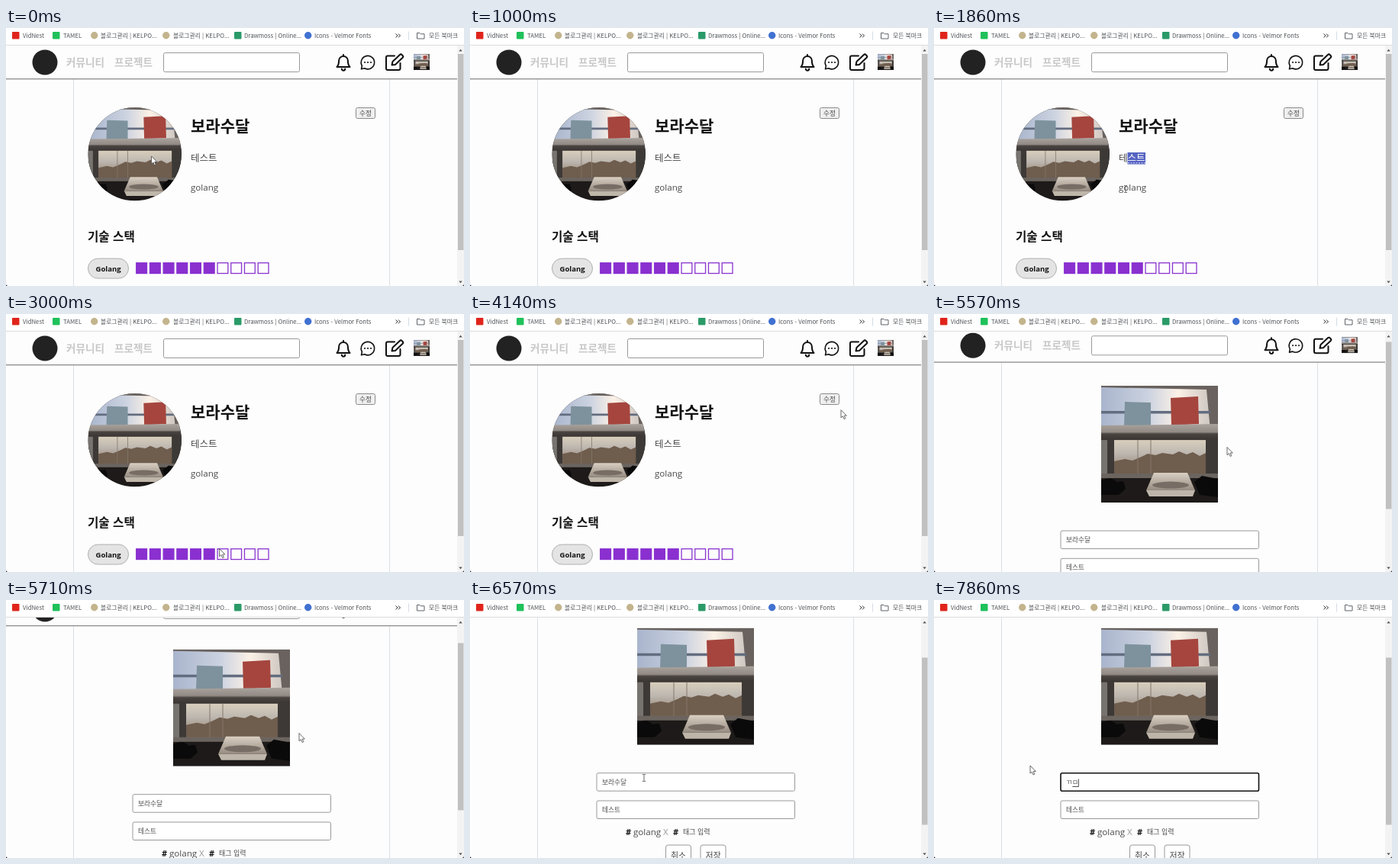
These frames come from a looping animation (600x338 px, 8000 ms). An HTML page:

```html
<!DOCTYPE html>
<html lang="ko">
<head>
<meta charset="utf-8">
<title>프로필 수정</title>
<style>
html, body { margin: 0; width: 100%; height: 100%; overflow: hidden; background: #fff; }
#stage { display: block; width: 100vw; height: 100vh; }
text { font-family: "Noto Sans CJK KR", "Noto Sans CJK", sans-serif; fill: #4a4a4a; white-space: pre; }
.latin { font-family: "Open Sans", "Noto Sans", sans-serif; }
.mark { font-size: 7.8px; fill: #505357; }
.nav { font-size: 13.6px; font-weight: 700; fill: #c8c8c8; }
.body { font-size: 12.5px; font-weight: 300; }
.small { font-size: 8.7px; }
.bold { font-weight: 700; fill: #111; }
.line { fill: none; stroke: #111; stroke-width: 2; stroke-linejoin: round; stroke-linecap: round; }
.field { fill: #fff; stroke: #999; }
.sel { fill: #5563c1; }
</style>
</head>
<body>
<svg id="stage" viewBox="0 0 600 338">
  <defs>
    <linearGradient id="sky">
      <stop offset="0" stop-color="#a9b5cd"/>
      <stop offset=".4" stop-color="#cbd2e0"/>
      <stop offset=".66" stop-color="#fbf1e6"/>
      <stop offset="1" stop-color="#c3bcb8"/>
    </linearGradient>
    <linearGradient id="view2" x2="0" y2="1">
      <stop offset="0" stop-color="#d8cebc"/>
      <stop offset=".4" stop-color="#bdb7b0"/>
      <stop offset="1" stop-color="#8d7a68"/>
    </linearGradient>
    <linearGradient id="shelf" x2="0" y2="1">
      <stop offset="0" stop-color="#aaa39d"/>
      <stop offset=".5" stop-color="#928a84"/>
      <stop offset=".62" stop-color="#4a4441"/>
      <stop offset="1" stop-color="#3a3532"/>
    </linearGradient>
    <linearGradient id="deck" x2="0" y2="1">
      <stop offset="0" stop-color="#d9cfc2"/>
      <stop offset="1" stop-color="#968b80"/>
    </linearGradient>
    <clipPath id="disc"><circle cx="76.5" cy="76.5" r="76.5"/></clipPath>
    <symbol id="photo" viewBox="0 0 153 153">
      <rect width="153" height="153" fill="#1d1a19"/>
      <rect width="153" height="54" fill="url(#sky)"/>
      <path d="M0 0H153V58H143L138 5 0 2z" fill="#69625e"/>
      <path d="M0 33H143V36.500H0z" fill="#636d80"/>
      <path d="M31 21l34 1v31l-35-1z" fill="#7d929d"/>
      <path d="M91 16l36-2 1 36-36 2z" fill="#a5453e"/>
      <path d="M0 52l153-2v21H0z" fill="url(#shelf)"/>
      <rect y="70" width="153" height="46" fill="#3d3936"/>
      <rect width="8" height="50" y="71" fill="#77736f"/>
      <rect x="17" y="71" width="120" height="44" fill="url(#view2)"/>
      <path d="M17 99l14-3 10 2 12-5 8-4 10 2 9-3 14 2 8-4 10 4 8-3 9 5 8-4V115H17z" fill="#6f5d4d"/>
      <path d="M48 71v44M65 71v44" stroke="#85796d"/>
      <path d="M0 115H153V121H0z" fill="#6b645f"/>
      <path d="M0 124q14-6 20 2l9-1 3 10-9 8H0zM122 126l10-8 21 4v24l-24-3z" fill="#0b0a0a"/>
      <path d="M69 114h44l10 23H59z" fill="url(#deck)"/>
      <ellipse cx="91" cy="130" rx="24" ry="4.500" fill="#776d64"/>
      <path d="M59 137h64l-3 8H63z" fill="#bfb6aa"/>
    </symbol>
  </defs>

  <rect width="600" height="338" fill="#fdfdfd"/>

  <svg y="23" width="591" height="315" viewBox="0 23 591 315">
    <g id="page">
      <path d="M88.500 67V500M502.500 67V500" stroke="#d9e0e6" fill="none"/>
      <circle cx="51" cy="45" r="16.500" fill="#222"/>
      <text class="nav" x="79" y="49.500">커뮤니티</text>
      <text class="nav" x="142" y="49.500">프로젝트</text>
      <rect class="field" x="206.500" y="32.500" width="178" height="25" rx="2"/>
      <path class="line" d="M433.500 51h17c-2.300-2.300-2.600-4.500-2.600-8.200a5.900 5.900 0 0 0-11.800 0c0 3.700-.3 5.900-2.600 8.200zM442 35v1.500M439.800 53.500a2.200 2.200 0 0 0 4.400 0"/>
      <path class="line" style="stroke-width:1.600" d="M466.400 49.500a8.700 8.700 0 1 1 3.400 3.300l-4.300 1z"/>
      <path class="line" d="M470 45h.1M474 45h.1M478 45h.1"/>
      <path class="line" d="M509 36.500h-9q-2 0-2 2v14.500q0 2 2 2h14.500q2 0 2-2v-7M505.500 48.500l1-4.500 9.500-9q1.300-1.200 2.500 0l1.200 1.200q1.200 1.200 0 2.500l-9.700 9.300z"/>
      <use href="#photo" x="534" y="34" width="21" height="21"/>
      <path d="M0 66.800H591" stroke="#6a6a6a"/>

      <g id="view">
        <g transform="translate(107.500 104) scale(.8)"><g clip-path="url(#disc)"><use href="#photo" width="153" height="153"/></g></g>
        <text id="title" class="bold" x="242" y="136" font-size="21"></text>
        <rect id="wordSel" class="sel" x="253.500" y="163" width="23.500" height="15.500"/>
        <text class="body" x="242" y="175">테<tspan id="word">스트</tspan></text>
        <path id="wordLine" d="M254 176.800h23" stroke="#dfe2ff" stroke-dasharray="2 1.500"/>
        <text class="latin" x="242" y="213" font-size="11.600">golang</text>
        <rect x="458.500" y="104.500" width="25" height="14" rx="2" fill="#efefef" stroke="#8a8a8a"/>
        <text class="small" x="463" y="115">수정</text>
        <text class="bold" x="107" y="278.500" font-size="15.600">기술 스택</text>
        <rect x="107.500" y="302" width="53" height="26" rx="13" fill="#e4e4e4" stroke="#b0b0b0"/>
        <text class="latin bold" x="117.500" y="318.500" font-size="9.500">Golang</text>
        <g id="level" stroke="#8a34d0" stroke-width="1.300"></g>
      </g>

      <g id="edit">
        <use href="#photo" x="219" y="97.800" width="153" height="153"/>
        <rect id="nameBox" class="field" x="166" y="287.700" width="259.500" height="23.500" rx="2"/>
        <rect id="nameSel" class="sel" y="293.500" height="12.500"/>
        <text class="small" x="173" y="303"><tspan id="kept"></tspan><tspan id="picked" fill="#fff"></tspan></text>
        <path id="caret" stroke="#222" stroke-width=".8" fill="none"/>
        <rect class="field" x="166" y="324" width="259.500" height="23.500" rx="2"/>
        <text class="small" x="173" y="339">테스트</text>
        <text class="latin bold" x="204" y="369" font-size="11">#</text>
        <text class="latin" x="214" y="369" font-size="11.600">golang</text>
        <text class="latin" x="253" y="369" font-size="11.600" style="fill:#999">X</text>
        <text class="latin bold" x="266" y="369" font-size="11">#</text>
        <text x="279" y="367.500" font-size="9">태그 입력</text>
        <rect class="field" x="256.500" y="382" width="33" height="26" rx="3"/>
        <rect class="field" x="302" y="382" width="33" height="26" rx="3"/>
        <text x="263" y="399.500" font-size="11">취소</text>
        <text x="308.500" y="399.500" font-size="11">저장</text>
      </g>
    </g>
  </svg>

  <rect x="591" y="23" width="9" height="315" fill="#f3f3f3"/>
  <path d="M593.300 30.500h4.400l-2.200-2.800zM593.300 331.500h4.400l-2.200 2.800z" fill="#555"/>
  <rect id="thumb" x="592" width="7.500" fill="#c1c1c1"/>

  <rect width="600" height="23" fill="#fff"/>
  <path d="M0 22.500H600" stroke="#dcdcdc"/>
  <g id="marks"></g>
  <path d="M510.500 7.500l2.500 2.500-2.500 2.500M514 7.500l2.500 2.500-2.500 2.500" fill="none" stroke="#333"/>
  <path d="M527.500 4.500v11" stroke="#d5dbe3"/>
  <path d="M538.500 6.500h3.500l1.200 1.300h4.800v6.200h-9.500z" fill="none" stroke="#5f6368"/>
  <text class="mark" x="554" y="12.800">모든 북마크</text>
  <path d="M0 335q0 3 3 3H0zM600 335q0 3-3 3h3z" fill="#222"/>

  <path id="arrow" d="M0 0V10.200L2.400 8.100 4.100 12 5.800 11.200 4.200 7.500H7.300z" fill="#fff" stroke="#444" stroke-width=".8"/>
  <path id="beam" d="M-2-4.500H-.6L0-4 .6-4.500H2M0-4V4M-2 4.500H-.6L0 4 .6 4.500H2" fill="none" stroke="#555" stroke-width=".9"/>
</svg>
<script>
const LOOP = 8000, RATE = 7;
const NAME = "보라수달";
const $ = id => document.getElementById(id);

function add(parent, tag, attrs, text = "") {
  const el = document.createElementNS("http://www.w3.org/2000/svg", tag);
  for (const key in attrs) el.setAttribute(key, attrs[key]);
  el.textContent = text;
  parent.append(el);
}

// icon x, shape, colour, label x, label
const bookmarks = [
  [8, "rect", "#e0241b", 22, "VidNest"],
  [61, "rect", "#1fc15b", 75, "TAMEL"],
  [111, "circle", "#c3b48d", 124, "블로그관리 | KELPO..."],
  [205, "circle", "#c3b48d", 219, "블로그관리 | KELPO..."],
  [299, "rect", "#2a9a68", 312, "Drawmoss | Online..."],
  [391, "circle", "#4070d0", 404, "Icons - Velmor Fonts"]
];
for (const [x, shape, fill, tx, label] of bookmarks) {
  const box = shape === "rect"
    ? { x, y: 5, width: 9.5, height: 9.5, rx: 1 }
    : { cx: x + 4.7, cy: 9.8, r: 4.7 };
  add($("marks"), shape, { ...box, fill });
  add($("marks"), "text", { class: "mark", x: tx, y: 12.8 }, label);
}
for (let i = 0; i < 10; i++) {
  add($("level"), "rect", {
    x: 170.7 + i * 17.72, y: 307.7, width: 13.8, height: 13.8,
    fill: i < 6 ? "#8a2fd0" : "none"
  });
}
$("title").textContent = NAME;

// time, x, y, 1 = text pointer
const pointer = [
  [0, 190.5, 168, 0], [290, 184, 175, 0], [570, 222, 150, 0], [860, 290, 120, 1],
  [1140, 318, 129, 1], [1290, 314, 132, 1], [1570, 277, 171, 1], [1710, 253, 171, 1],
  [1860, 251, 211, 1], [2290, 290, 212, 0], [2860, 325, 306, 0], [3430, 140, 312, 0],
  [3570, 131, 308, 0], [3860, 330, 220, 0], [4140, 486, 125.7, 0], [4430, 476, 110, 0],
  [4570, 481, 111, 0], [4710, 481, 111, 0], [5000, 440, 146, 0], [5290, 384, 174.5, 0],
  [6000, 384, 174.5, 0], [6430, 228, 233, 1], [6710, 228, 233, 1], [6860, 190, 234, 1],
  [7000, 165, 230, 1], [7140, 126, 217, 0]
];
const scrolling = [[5430, 0], [5570, 3.7], [5710, 33], [5860, 54], [6000, 61]];

function sample(keys, t) {
  let i = 0;
  while (i < keys.length - 1 && keys[i + 1][0] <= t) i++;
  const a = keys[i], b = keys[i + 1];
  if (!b || t <= a[0]) return a.slice(1);
  const p = (t - a[0]) / (b[0] - a[0]);
  return a.slice(1).map((v, n) => v + (b[n + 1] - v) * p);
}

const show = (id, on) => $(id).style.display = on ? "" : "none";
const set = (id, key, value) => $(id).setAttribute(key, value);

function drawField(t) {
  const focus = t >= 6710;
  const typed = t >= 7860 ? "ㄲㅁ" : t >= 7710 ? "ㄲ" : "";
  const value = typed || NAME;
  const count = typed ? 0 : t >= 7000 ? 4 : t >= 6860 ? 2 : 0;
  const split = value.length - count;
  $("kept").textContent = value.slice(0, split);
  $("picked").textContent = value.slice(split);
  set("nameSel", "x", 173 + split * 8);
  set("nameSel", "width", count * 8);
  $("nameBox").style.stroke = focus ? "#111" : "";
  $("nameBox").style.strokeWidth = focus ? 1.6 : 1;
  const end = 173.4 + value.length * 8;
  show("caret", focus && !count);
  set("caret", "d", `M${end} 295.5v10` + (typed ? "h-8" : ""));
}

function draw(time) {
  const step = Math.floor((time + 5) * RATE / 1000);
  const t = Math.round(step * 100 / RATE) * 10;
  const editing = t >= 4710;
  const [scroll] = sample(scrolling, t);
  const [x, y, kind] = sample(pointer, t);
  const selected = t >= 1710 && t < 2430;

  show("view", !editing);
  show("edit", editing);
  set("page", "transform", `translate(0 ${-scroll})`);
  set("thumb", "y", 34 + scroll * 0.68);
  set("thumb", "height", editing ? 219 : 257);

  show("wordSel", selected);
  show("wordLine", selected);
  $("word").style.fill = selected ? "#fff" : "";
  drawField(t);

  const beam = kind > 0.5;
  show("beam", beam);
  show("arrow", !beam);
  set(beam ? "beam" : "arrow", "transform", `translate(${x} ${y})`);
}

const start = performance.now();
function tick() {
  draw((performance.now() - start) % LOOP);
  requestAnimationFrame(tick);
}
tick();
</script>
</body>
</html>
```
